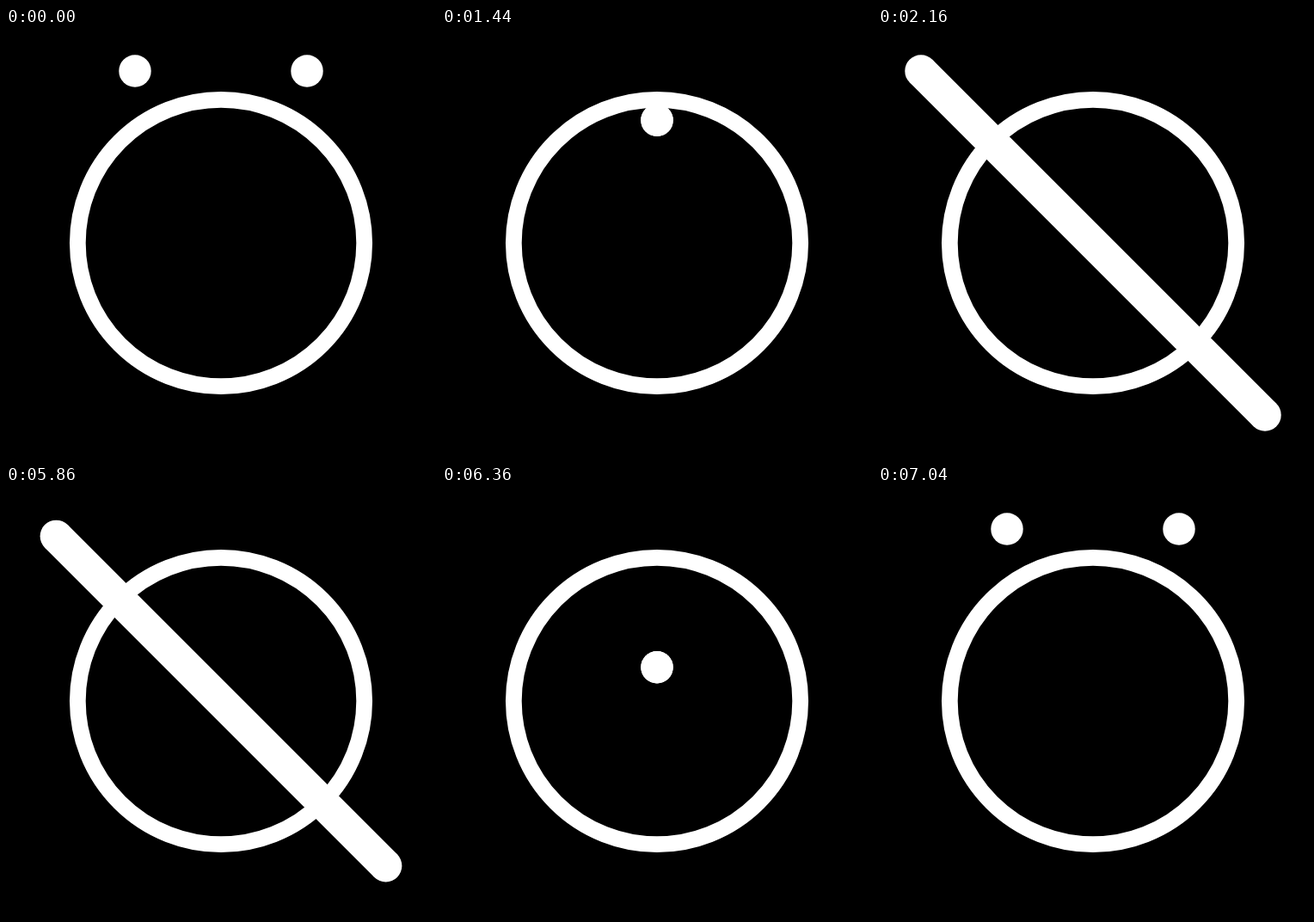
Animation of 500 by 500 pixels, one loop 8020 ms. Source, as an HTML page:

```html
<!DOCTYPE html>
<html lang="en">
<head>
<meta charset="utf-8">
<title>Dots and ring</title>
<style>
  html, body { margin: 0; width: 100%; height: 100%; overflow: hidden; background: #000; }
  svg { display: block; width: 100%; height: 100%; }
</style>
</head>
<body>
<svg viewBox="0 0 500 500" fill="none" stroke="#fff">
  <circle cx="250" cy="250" r="166.67" stroke-width="18.75"/>
  <line id="bar" stroke-width="37.5"/>
  <circle id="dotA" r="18.75" fill="#fff" stroke="none"/>
  <circle id="dotB" r="18.75" fill="#fff" stroke="none"/>
</svg>
<script>
  const LOOP = 8020, TICK = 20, MOVE = 1200;
  const OUT = 960, BACK = 5840;
  const [bar, dotA, dotB] = ['bar', 'dotA', 'dotB'].map(id => document.getElementById(id));

  const clamp = v => Math.min(1, Math.max(0, v));
  const ease = x => x + x * (1 - x) * (0.0461 + 0.2284 * x - 0.109 * x * x);

  function set(el, attrs) {
    for (const name in attrs) el.setAttribute(name, attrs[name].toFixed(3));
  }

  // Progress along the path: the way back mirrors the way out.
  function progress(t) {
    return t < BACK ? ease(clamp((t - OUT) / MOVE)) : ease(clamp((BACK + MOVE - t) / MOVE));
  }

  function draw(time) {
    const t = Math.floor((time % LOOP) / TICK + 1e-6) * TICK;
    const s = 3 * progress(t);
    const merge = clamp(s), fall = clamp(s - 1), grow = clamp(s - 2);

    const dx = 100 * (1 - merge) + 200 * grow;
    const dy = 200 * grow;
    const y = 50 + 200 * fall;
    const a = { x: 250 - dx, y: y - dy };
    const b = { x: 250 + dx, y: y + dy };

    set(dotA, { cx: a.x, cy: a.y });
    set(dotB, { cx: b.x, cy: b.y });
    set(bar, { x1: a.x, y1: a.y, x2: b.x, y2: b.y });
    bar.style.display = grow > 0 ? '' : 'none';
  }

  const start = performance.now();
  function loop() {
    draw(performance.now() - start);
    requestAnimationFrame(loop);
  }
  loop();
</script>
</body>
</html>
```
